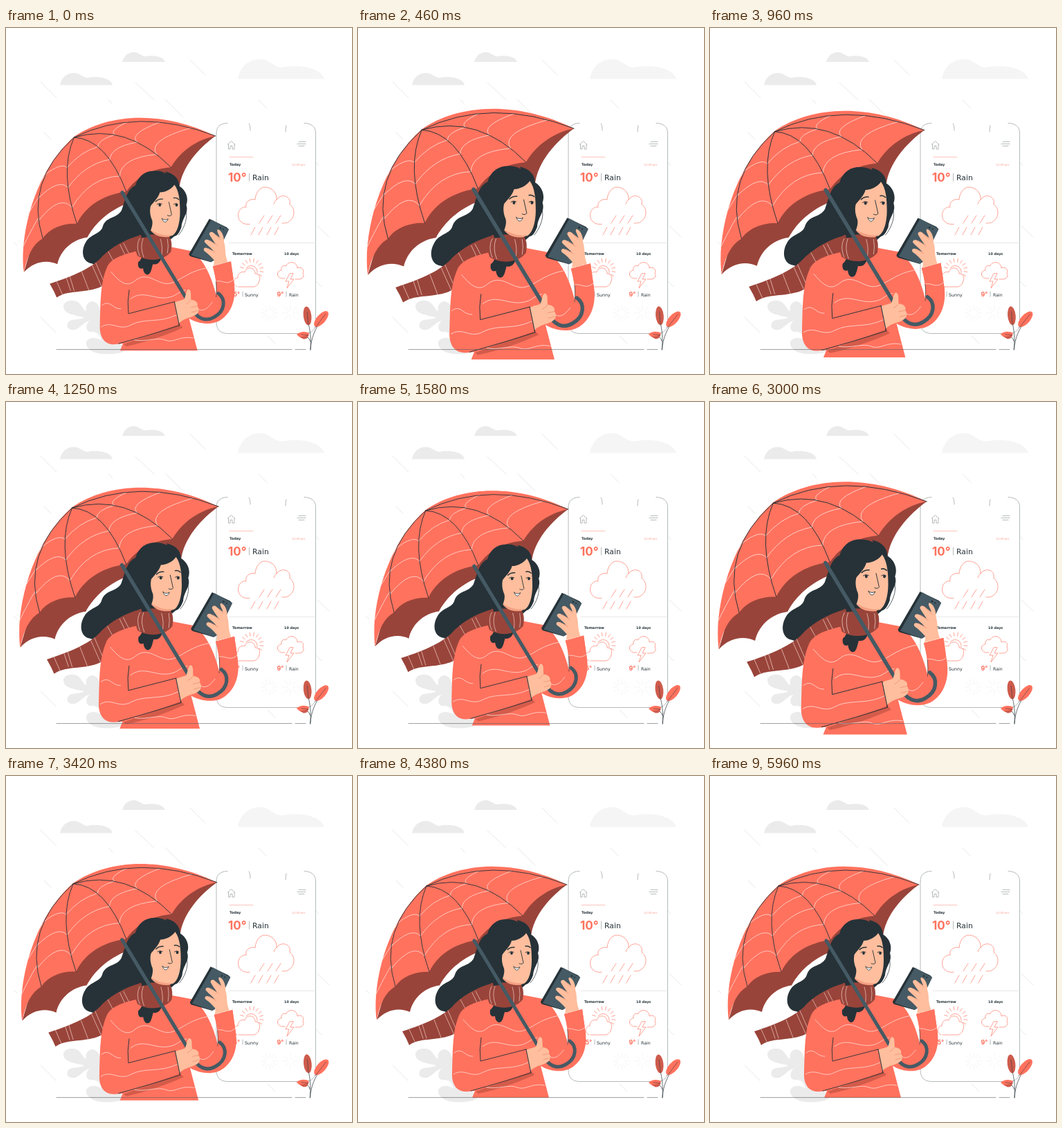
Write an HTML page that moves like this. It is 500 px wide and 500 px high and loops after 6 s.

```html
<!DOCTYPE html>
<html lang="en">
<head>
<meta charset="utf-8">
<title>Rainy day forecast</title>
<style>
html, body { margin: 0; width: 100%; height: 100%; overflow: hidden; background: #fff; }
svg { display: block; width: 100vw; height: 100vh; }
path { stroke-linecap: round; stroke-linejoin: round; }
text { font-family: "DejaVu Sans", sans-serif; fill: #263238; }
.bold { font-weight: 700; }
.temp { font: 700 9px Inter, sans-serif; fill: #ff725e; }
.o { fill: #ff725e; }
.d { fill: #263238; }
.r { fill: #99443a; }
.skin { fill: #ffbe9d; }
.ink { fill: none; stroke: #263238; stroke-width: .9; }
.thin { fill: none; stroke: #858b8e; stroke-width: .6; }
.hotline { fill: none; stroke: #ff725e; stroke-width: .65; }
.white { fill: none; stroke: #ffe3de; stroke-width: .75; }
.crease { fill: none; stroke: #e88e70; stroke-width: .7; }
.rain { fill: none; stroke: #e4e4e4; stroke-width: .8; }
</style>
</head>
<body>
<svg viewBox="0 0 500 500">
  <!-- sky -->
  <g fill="#ebebeb">
    <path d="M78 82.500C80 72 88 65 98 65C107 65 111 72 118 72C130 69 151 71 154 82.500z"/>
    <path d="M168 49C170 41 176 35 185 35C192 35 195 41 202 41C211 39 227 40 230 49z"/>
    <path fill="#f5f5f5" d="M335 73.500C338 57 350 45 367 45C382 45 386 57 400 57C420 52 454 56 460 73.500z"/>
  </g>
  <path class="rain" d="M50 78l23 23M148 104l6 6M187 79l27 25M266 46l22 22M230 103l26 26M365 104l12 12M450 286l17 16M50 418l22 22M55 151l10 10M378 445l11 11M12 310l4 4M448 195l4 4M448 366l8 8"/>

  <!-- shrub -->
  <path fill="#ebebeb" d="M83 402C84 393 99 391 106 398C111 403 112 408 116 409C113 399 123 391 130 397C137 402 135 412 143 418L152 450C163 456 172 458 173 464C171 472 139 473 129 469C117 465 112 455 119 450C126 446 135 449 138 452C136 443 133 440 126 439C113 441 115 427 121 423C113 424 108 433 100 436C90 438 86 431 90 425C95 419 107 423 113 418C101 415 83 414 83 402z"/>

  <!-- weather app -->
  <path class="thin" d="M304 152C304 143 309 138 320 137.500M431 137.500C442 138 447.500 143 447.500 152V424C447.500 436 443 441 431 441.500H320C309 441 304 436 304 424V152"/>
  <path class="thin" d="M351 138Q353 140 353 148M405 141Q404 145 404 150M320 168.500L325.500 163.500L331 168.500M321.500 168V175H324V170.500H327V175H330V168M423 164.500H433M421 167.500H433M423 170.500H431"/>
  <path class="hotline" style="stroke:#ffa396" d="M323 186.500H357"/>
  <path class="rain" d="M322 310.500H446"/>
  <text class="bold" x="323" y="199" font-size="5">Today</text>
  <text x="413" y="198.500" font-size="4" style="fill:#ff9c8e">12:00 pm</text>
  <text class="temp" x="321" y="222" style="font-size:17px">10°</text>
  <path class="thin" d="M351.500 210V221"/>
  <text x="356" y="220" font-size="10.800">Rain</text>
  <path class="hotline" d="M352 283.500H348C338 283 334 274 336 267C338 260 344 258 347 259C345 251 353 246 360 248C361 237 367 230 374 230C384 230 392 238 391 248C398 238 413 243 410 255C418 260 418 273 410 279C407 282 404 282 399 282M391 248Q388 250 387 254"/>
  <path class="hotline" d="M373 271l-7 11M385 271l-7 11M397 271l-7 11M360 288l-6 11M371 288l-6 11M383 288l-6 11M394 288l-6 11"/>
  <text class="bold" x="327" y="327.500" font-size="5.200">Tomorrow</text>
  <text class="bold" x="402" y="327.500" font-size="4.900">10 days</text>
  <path class="hotline" d="M334 374C326 371 329 361 335 361C335 354 341 351 345 353C347 344 360 345 360 355C366 355 368 360 366 365C365 371 361 374 357 374H336M347 347A9 9 0 0 1 363 354"/>
  <path class="hotline" id="sunRays"/>
  <path class="hotline" d="M403 362H399C391 361 390 351 398 350C397 344 402 342 405 344C407 336 421 337 421 347C426 344 432 349 429 354C432 359 428 363 423 363H418M410 355L404 366H409L406 376L416 363H411L415 355z"/>
  <text class="temp" x="324.500" y="388">15°</text>
  <text x="345" y="387.500" font-size="6.300">Sunny</text>
  <text class="temp" x="391.500" y="388">9°</text>
  <text x="409" y="387.500" font-size="6.200">Rain</text>
  <path class="thin" d="M342 381V388M405 381V388"/>
  <path class="rain" id="faintRays" style="stroke:#f3f3f3"/>

  <!-- seedling -->
  <g id="plant">
    <path class="ink" style="stroke-width:.7" d="M440 465C441 449 440 438 436 423M440 465C441 447 447 434 457 420M440 453Q437 445 430 444"/>
    <ellipse cx="435.500" cy="416" rx="5.800" ry="13.500" fill="#ce5b4c" transform="rotate(-7 435 416)"/>
    <ellipse class="o" cx="455.500" cy="420.500" rx="6.500" ry="14" transform="rotate(41 455.500 420.500)"/>
    <path class="o" d="M420 443C425 438 433 438 438 441C437 450 429 452 420 443z"/>
    <path fill="#ce5b4c" d="M424 446Q431 447 437 443Q437 450 430 449.500z"/>
    <path class="ink" style="stroke-width:.5" d="M435 410L437 429M462 413L447 433M427 443L437 444"/>
  </g>

  <!-- woman under the umbrella -->
  <g id="woman">
    <path class="r" d="M27 352.500C41 337 60 334 75 341C79 323 94 306 118 302.500C127 286 143 268 170 256L200 250L250 232C253 202 278 174 302 157L200 150L60 240z"/>
    <path class="o" d="M27 352.500C20 300 42 208 99 158C145 126 222 118 302 157C276 162 252 178 238 202C213 204 190 214 174 237C147 240 117 254 103 283C84 282 64 289 54 304C40 312 32 328 27 352.500z"/>
    <g id="rings" class="white"></g>
    <g id="ribs" class="ink"></g>

    <path class="d" d="M213 207C200 207 190 216 187 228C174 234 172 251 167 264C160 276 145 272 140 287C137 298 123 297 116 309C108 322 111 338 124 340C134 344 144 340 150 335C168 331 177 314 192 312L230 312L244 300L248 236C244 220 233 206 213 207z"/>
    <path class="d" d="M230 208C244 211 250 220 250 229C259 234 264 246 260 256C264 268 254 274 253 288C250 296 247 300 243 301L247 266z"/>
    <path class="ink" style="stroke-width:.7" d="M258 262C264 272 257 290 249 299"/>

    <path class="r" d="M192 300C171 306 154 316 140 329C126 346 98 358 64 369L70 380L74 389C89 378 111 383 134 375C158 365 169 345 196 329z"/>
    <path class="white" style="stroke-width:.6" d="M74 366l8 18M88 361l6 18M93 359l6 20M110 352l10 26M125 343l13 29M130 339l13 30M148 323l14 26M165 313l12 25M170 311l12 23"/>

    <!-- coat -->
    <path class="o" d="M190 322C168 327 151 333 146 346C136 369 137 400 136 428C135 446 143 457 158 456L169 455L165 465H276L264 419C277 427 298 430 311 420C326 409 331 390 329 372L324 337L298 344C302 358 304 372 303 386C297 360 285 333 267 322L236 316z"/>
    <path fill="#d45b4a" d="M170 456L250 427L255 432C228 444 202 453 174 459z"/>
    <path class="ink" d="M178 378Q175 395 177 412L243 395L250 429Q210 442 163 455"/>
    <path class="white" d="M152 352C164 366 174 375 186 365C203 351 215 367 231 369C248 370 260 350 293 346M139 400C151 391 154 406 166 405M180 391C197 377 213 392 233 389C247 387 248 380 259 378M138 431C154 421 163 438 181 428C200 418 221 426 246 414M277 405C284 411 292 403 297 396M186 450C203 453 218 445 230 450S250 443 270 447"/>

    <!-- hair below the scarf, neck, face -->
    <path class="d" d="M198 318C196 326 198 333 191 338C190 344 192 349 198 347C198 350 200 356 204 356C209 356 210 348 212 341C221 343 227 333 224 320z"/>
    <path class="r" d="M193 299C184 307 186 320 190 329C207 339 229 335 238 323C240 312 239 303 232 298z"/>
    <path class="white" style="stroke-width:.6" d="M193 304Q187 315 193 329M198 304Q193 317 199 331M223 305Q227 318 224 331M233 305Q235 315 233 325"/>
    <path class="skin" d="M243 227C250 236 251 252 251 266C251 282 247 296 240 300C230 302 214 299 206 290L205 262C213 252 220 246 222 238C230 238 239 233 243 227z"/>
    <path fill="#f3a183" d="M208 291C217 297 229 301 240 299L235 302C223 303 213 300 208 291z"/>
    <path class="d" d="M238 214C231 229 221 236 214 247C206 257 207 269 211 278C213 287 207 294 207 302L196 303L190 283L202 222z"/>
    <ellipse class="d" cx="222" cy="256" rx="1.800" ry="2.200"/>
    <ellipse class="d" cx="246" cy="256" rx="1.800" ry="2.200"/>
    <path class="ink" d="M218 255Q221 252.500 225 254.500M242 255Q245 252.500 248 255M235 252L239 270Q237 273 233 271"/>
    <path class="ink" style="stroke-width:1.400" d="M216 251Q220 247 226 247.500M242 246Q246 245 249 248"/>
    <path d="M225 275.500Q229 279 234 276Q231 282 228 280Q226 278.500 225 275.500z" fill="#fff" stroke="#263238" stroke-width=".8"/>

    <!-- phone in hand -->
    <path class="skin" d="M299 343C302 333 297 326 292 319L302 295L312 305C318 314 314 323 319 338z"/>
    <path class="d" d="M293 276L264 326Q264 329 267 330L295 338L299 336L321 291L318 288z"/>
    <path fill="#455a64" d="M296 277L267 328L296 338L300 335L321 291z"/>
    <circle class="d" cx="309" cy="289" r="1.300"/>
    <circle class="d" cx="313" cy="291" r="1"/>
    <path class="skin" d="M304 340C300 335 292 326 287 323C283 320 286 316 290 318L299 322C295 317 289 313 286 309C286 305 290 305 293 307L302 312C298 306 295 302 293 298C293 294 297 294 299 296L308 303C307 298 303 294 305 291C311 292 315 302 314 311C313 320 316 327 319 337z"/>
    <path class="crease" d="M294 307L304 314M291 318L301 324M300 297L308 305"/>
    <path class="o" d="M298 344L324 337L329 372L304 380Q303 362 298 344z"/>
    <path class="white" d="M301 367C308 360 317 374 328 363"/>
    <path class="ink" style="stroke-width:.6" d="M303 366Q304 377 303 388"/>

    <!-- handle -->
    <path fill="none" stroke="#455a64" stroke-width="5" d="M168 238L266 400C274 420 288 424 300 417C316 408 317 391 306 383"/>
    <path class="skin" d="M243 396C249 393 253 393 257 391C260 386 259 379 263 377C268 378 266 386 267 392C275 393 277 397 276 401C280 407 277 412 273 414C268 418 259 417 249 426z"/>
    <path class="crease" d="M267 392Q264 396 260 398M276 401L267 403M276 408L268 410"/>
    <path class="ink" d="M243 395L250 429"/>
  </g>

  <path class="thin" style="stroke:#555c60" d="M73 464.600H413M418 464.600H433"/>
</svg>
<script>
const $ = id => document.getElementById(id);

// Umbrella ribs run from the apex: [control x, control y, end x, end y].
const apex = [99, 159];
const ribs = [
  [12, 242, 27, 352], [28, 222, 54, 304], [77, 208, 103, 283],
  [145, 161, 174, 237], [174, 137, 238, 202], [190, 114, 302, 157]
];
const onRib = ([cx, cy, ex, ey], t) => {
  const at = (a, c, e) => (1 - t) ** 2 * a + 2 * t * (1 - t) * c + t * t * e;
  return [at(apex[0], cx, ex), at(apex[1], cy, ey)];
};
const addPath = (parent, d) => {
  const p = document.createElementNS("http://www.w3.org/2000/svg", "path");
  p.setAttribute("d", d);
  parent.append(p);
};
ribs.slice(1).forEach(r => addPath($("ribs"), `M${apex}Q${r}`));
for (const t of [.4, .63, .84])
  for (let i = 0; i < 5; i++) {
    const a = onRib(ribs[i], t), b = onRib(ribs[i + 1], t);
    const mid = [0, 1].map(k => {
      const m = (a[k] + b[k]) / 2;
      return m + (apex[k] - m) * .27;
    });
    addPath($("rings"), `M${a}Q${mid} ${b}`);
  }

// Short spokes around a centre, between two radii.
const rays = (x, y, r1, r2, from, to, n) => Array.from({ length: n }, (_, i) => {
  const a = (from + (to - from) * i / (n - 1)) * Math.PI / 180;
  const c = Math.cos(a), s = Math.sin(a);
  return `M${x + r1 * c} ${y + r1 * s}L${x + r2 * c} ${y + r2 * s}`;
}).join("");
$("sunRays").setAttribute("d", rays(355, 350, 12, 17, -165, 30, 10));
$("faintRays").setAttribute("d", rays(381, 412, 5, 12, 0, 330, 12) + rays(411, 412, 4, 12, 0, 315, 8));

// Piecewise linear value from [time, value] stops.
const track = (stops, t) => {
  const i = stops.findIndex(s => s[0] > t);
  const [t0, v0] = stops[i - 1], [t1, v1] = stops[i];
  return v0 + (v1 - v0) * (t - t0) / (t1 - t0);
};
const pulse = [[0, 1], [600, 1.1], [1800, 1], [2400, 1], [3000, 1.1], [3600, 1], [6000, 1]];
const sway = [[0, 0], [750, 2], [2250, -2], [3000, 0]];
const lead = 40;

function draw(now) {
  const t = (now + lead) % 6000;
  $("woman").setAttribute("transform", `translate(181 298) scale(${track(pulse, t)}) translate(-181 -298)`);
  $("plant").setAttribute("transform", `rotate(${track(sway, t % 3000)} 442.500 434)`);
}
const start = performance.now();
const loop = () => {
  draw(performance.now() - start);
  requestAnimationFrame(loop);
};
loop();
</script>
</body>
</html>
```
